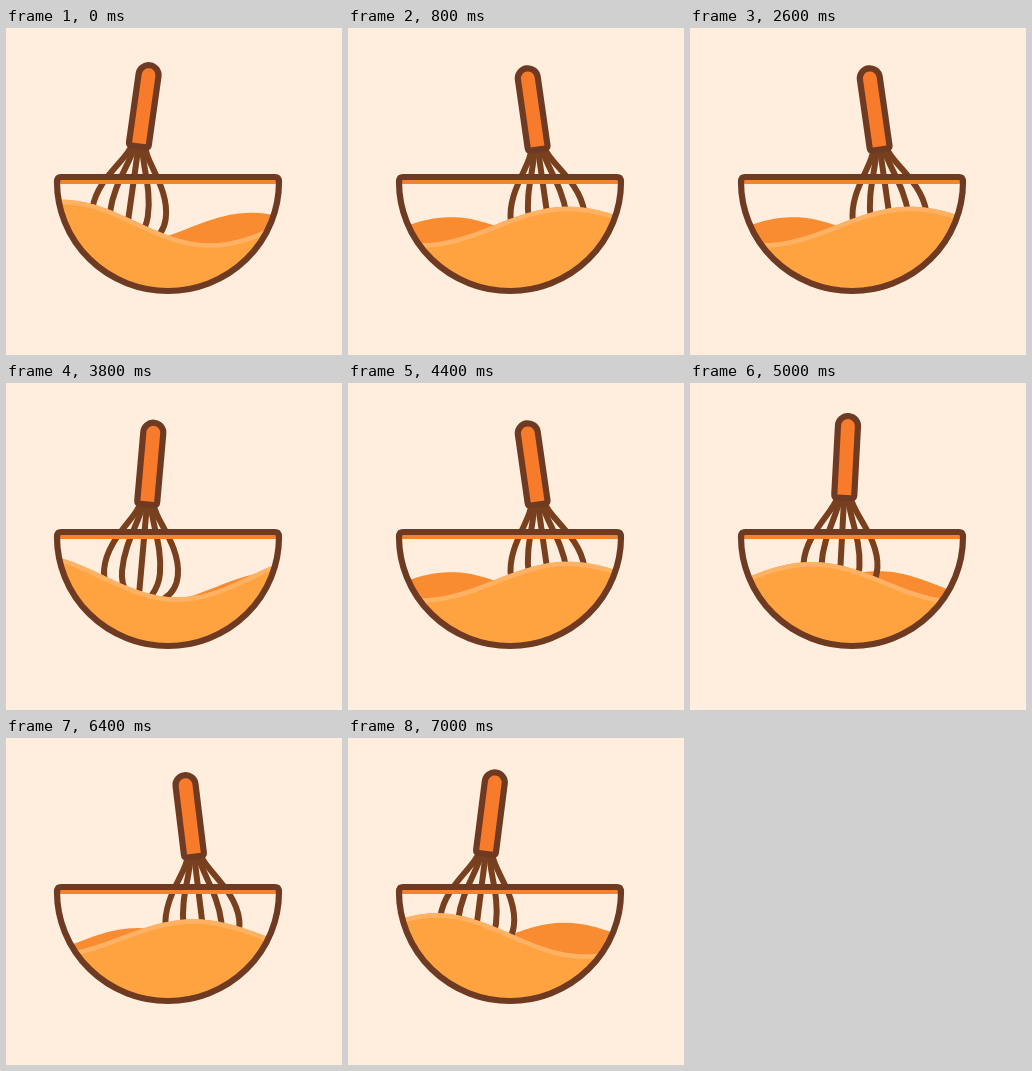
Write an HTML page that moves like this. It is 336 px wide and 327 px high and loops after 7100 ms.

```html
<!DOCTYPE html>
<html lang="en">
<head>
<meta charset="utf-8">
<title>Whisk and bowl</title>
<style>
  html, body { margin: 0; width: 100%; height: 100%; overflow: hidden; background: #ffeedd; }
  svg { display: block; }
  .line { stroke: #6f3a22; stroke-width: 6.2; stroke-linejoin: round; }
</style>
</head>
<body>
<svg width="336" height="327" viewBox="0 0 336 327">
  <defs>
    <path id="bowl" d="M55 149H269Q273 149 273 154A111 109 0 0 1 51 154Q51 149 55 149Z"/>
    <clipPath id="inside"><use href="#bowl"/></clipPath>
    <clipPath id="batter"><path id="surface"/></clipPath>
  </defs>
  <path id="back" clip-path="url(#inside)" fill="#f98b30"/>
  <g id="whisk" class="line">
    <g fill="none" stroke="#78401f" stroke-width="6">
      <path d="M-7 0C-9 14-37 38-37 68C-37 90-18 100 0 100C18 100 37 90 37 68C37 38 9 14 7 0"/>
      <path d="M-4 0C-6 18-19 40-19 68C-19 85-8 100 0 100C8 100 19 85 19 68C19 40 6 18 4 0"/>
      <path d="M0 0V100"/>
    </g>
    <path fill="#f77b2b" d="M-10-72A10 10 0 0 1 10-72V-3Q10 0 7 0H-7Q-10 0-10-3Z"/>
  </g>
  <g clip-path="url(#inside)">
    <path id="front" fill="#ffa340"/>
    <path id="shine" clip-path="url(#batter)" fill="none" stroke="#ffb164" stroke-width="9"/>
    <path d="M51 154H273" stroke="#f5822f" stroke-width="4"/>
  </g>
  <use href="#bowl" class="line" fill="none"/>
</svg>
<script>
  const STEP = 100, STEPS = 71, STEPS_PER_STIR = 18;
  const get = id => document.getElementById(id);
  const rad = deg => deg * Math.PI / 180;
  const cos = deg => Math.cos(rad(deg));
  const sin = deg => Math.sin(rad(deg));

  // Sine-shaped surface whose crest sits at the given x
  function wave(crest, length, middle, height) {
    let d = '';
    for (let x = 44; x <= 280; x += 4) {
      const y = middle - height * cos((x - crest) / length * 360);
      d += (d ? 'L' : 'M') + x + ' ' + y.toFixed(2);
    }
    return d;
  }

  function draw(angle) {
    const front = wave(352 - 296 * angle / 360, 296,
      195.8 - 3.5 * cos(angle - 50), 19.8 + 2.3 * cos(angle - 30));
    const back = wave(245 + 256 * angle / 360, 256,
      204.5 - 2.5 * cos(angle + 20) - 1.8 * cos(2 * angle + 40), 16);
    const body = front + 'V280H44Z';
    get('front').setAttribute('d', body);
    get('surface').setAttribute('d', body);
    get('shine').setAttribute('d', front);
    get('back').setAttribute('d', back + 'V280H44Z');

    const x = 161.7 - 29.3 * cos(angle + 5);
    const y = 119.3 + 4.4 * sin(angle - 11);
    const tilt = 8.2 * cos(angle + 12);
    get('whisk').setAttribute('transform', `translate(${x} ${y}) rotate(${tilt})`);
  }

  const start = performance.now();
  function tick() {
    const step = Math.floor((performance.now() - start) / STEP) % STEPS;
    draw(step % STEPS_PER_STIR / STEPS_PER_STIR * 360);
    requestAnimationFrame(tick);
  }
  tick();
</script>
</body>
</html>
```
